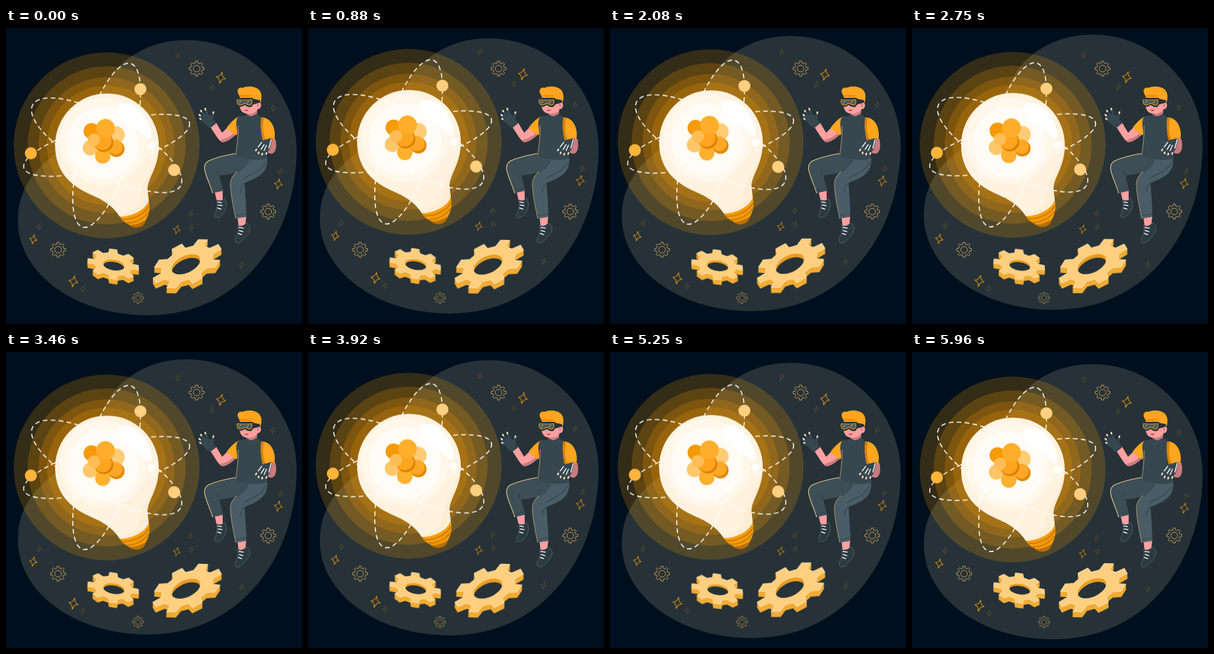
An HTML page without scripts that plays this animation: 500 px wide and 500 px high, repeating every 6000 ms.

```html
<!DOCTYPE html>
<html lang="en">
<head>
<meta charset="utf-8">
<title>Bright idea</title>
<style>
html, body { margin: 0; width: 100%; height: 100%; overflow: hidden; background: #000f1d; }
svg { display: block; width: 100vw; height: 100vh; }
.float { animation: float 3s linear -60ms infinite; }
.slow { animation-duration: 6s; }
.sway { transform-origin: 251px 404px; animation: sway 3s linear -60ms infinite; }
@keyframes float { 50% { transform: translateY(-10px); } }
@keyframes sway { 25% { transform: rotate(1deg); } 75% { transform: rotate(-1deg); } }
.halo { fill: #ffa000; fill-opacity: .2; }
.orbit { fill: none; stroke: #fff; stroke-width: 1.7; stroke-dasharray: 8 5.5; }
.line { fill: none; stroke: #e0ac5c; stroke-width: .9; }
.line use, .line circle, .spark use { vector-effect: non-scaling-stroke; }
.spark { fill: none; stroke: #f59a0c; stroke-width: 1.1; }
.dim { stroke: #a8721d; stroke-width: .8; }
.side { fill: #f0ab35; stroke: #f0ab35; stroke-width: .3; }
.face { fill: #ffcf80; stroke: #ffe6b8; stroke-width: .25; }
.skin { fill: #ffa0a0; }
.shade { fill: #c97b7d; }
.dark { fill: #37474f; }
.shoe { fill: #2c3a42; stroke: #5d6f78; stroke-width: .8; }
.rim { fill: none; stroke: #ffd48c; stroke-width: 1.1; }
.fold { fill: none; stroke: #33434b; stroke-width: 1.2; }
.lace { fill: none; stroke: #fff; stroke-width: 1.5; stroke-linecap: round; }
.finger { fill: none; stroke: #37474f; stroke-width: 4; stroke-linecap: round; stroke-linejoin: round; }
.tip { fill: none; stroke: #ffe0bd; stroke-width: 2.6; stroke-linecap: round; }
</style>
</head>
<body>
<svg viewBox="0 0 500 500" xmlns="http://www.w3.org/2000/svg">
<defs>
  <path id="cog" d="M9.3-2.2L12.6-1.9V1.9L9.3 2.2L8.1 5L10.2 7.6L7.6 10.2L5 8.1L2.2 9.3L1.9 12.6H-1.9L-2.2 9.3L-5 8.1L-7.6 10.2L-10.2 7.6L-8.1 5L-9.3 2.2L-12.6 1.9V-1.9L-9.3-2.2L-8.1-5L-10.2-7.6L-7.6-10.2L-5-8.1L-2.2-9.3L-1.9-12.6H1.9L2.2-9.3L5-8.1L7.6-10.2L10.2-7.6L8.1-5Z"/>
  <g id="icon"><use href="#cog"/><circle r="5.6"/></g>
  <path id="star" d="M0-10Q1-1.5 8 0Q1 1.5 0 10Q-1 1.5-8 0Q-1-1.5 0-10Z" transform="rotate(12)"/>
  <use id="dot" href="#star" transform="scale(.52)"/>
  <clipPath id="hole"><circle r="5.3"/></clipPath>
  <g id="bore" clip-path="url(#hole)">
    <circle r="5.3" fill="#e89c22"/><circle r="5.3" cy="2.2" fill="#263238"/>
  </g>
  <use id="big" href="#cog" transform="matrix(4.57 -1.46 0 2.88 0 0) rotate(27.4)"/>
  <use id="small" href="#cog" transform="matrix(3.39 .45 0 2 0 0)"/>
  <path id="glass" d="M83 198.400A87.500 87.500 0 0 1 258 198.400C258 238 238 254 239 274L241 292C235 309 211 319 192 319C184 306 173 297 157 288C137 278 83 262 83 198.400Z"/>
  <clipPath id="inGlass"><use href="#glass"/></clipPath>
</defs>

<path class="float slow" fill="#263238" d="M306 20.400C410 20.400 491 108 491 205C491 350 400 485.400 240 485.400C110 485.400 20 410 20 326C20 270 50 235 95 205C150 168 150 110 190 66C225 32 265 20.400 306 20.400Z"/>

<g class="line">
  <use href="#icon" x="322" y="68.500"/>
  <use href="#icon" x="88" y="374.500"/>
  <use href="#icon" x="443" y="310"/>
  <use href="#icon" transform="translate(223 456) scale(.75)"/>
</g>

<g class="float">
  <g class="spark">
    <use href="#star" x="363" y="84.400"/>
    <use href="#star" transform="translate(460 264) scale(.9)"/>
    <use href="#star" transform="translate(46 357.500) scale(.85)"/>
    <use href="#star" transform="translate(288.500 341) scale(.75)"/>
    <use href="#star" transform="translate(114 428.500)"/>
  </g>
  <g class="spark dim">
    <use href="#dot" x="290" y="47"/>
    <use href="#dot" x="348" y="101"/>
    <use href="#dot" x="451" y="136"/>
    <use href="#dot" x="463.500" y="243"/>
    <use href="#dot" x="398" y="400.500"/>
    <use href="#dot" x="312" y="314.500"/>
    <use href="#dot" x="313" y="337.500"/>
    <use href="#dot" x="56" y="336"/>
    <use href="#dot" x="130" y="441.500"/>
  </g>

  <g class="halo">
    <circle cx="170" cy="198.400" r="157"/>
    <circle cx="170" cy="198.400" r="133.500"/>
    <circle cx="170" cy="198.400" r="115"/>
    <circle cx="170" cy="198.400" r="101"/>
  </g>

  <path fill="#f59b0b" d="M192 318C213 318 235 308 241 290C244 305 242 316 235 327C233 338 216 340 207 332C201 329 195 325 192 318Z"/>
  <g fill="none" stroke="#c97a00" stroke-width="2">
    <path d="M195 323.500C215 325 236 314 242 300"/>
    <path d="M202 329.500C217 331 234 322 240.500 311"/>
  </g>
  <path fill="#b96f00" d="M208 333C219 334 230 328 235 325C235 338 216 341 208 333Z"/>

  <use href="#glass" fill="#fff3e0"/>
  <g clip-path="url(#inGlass)">
    <path fill="#fdebd0" d="M258 180C258 245 222 262 226 288C224 304 209 313 190 315L195 322L250 300V250L265 190Z" opacity=".7"/>
    <circle cx="164" cy="192" r="74" fill="#fff" opacity=".3"/>
    <circle cx="164" cy="194" r="61" fill="#fff" opacity=".55"/>
  </g>
  <path fill="#fff" d="M189 141C184 128 205 122 222 136C239 150 249 178 245 187C241 191 235 183 228 176C216 168 196 162 189 141Z"/>
  <circle cx="245.500" cy="199.500" r="6.800" fill="#fff"/>

  <g class="orbit" transform="translate(170 198.500)">
    <ellipse rx="42" ry="144" transform="rotate(16.400)"/>
    <ellipse rx="142.400" ry="47.300" transform="rotate(28.700)"/>
    <ellipse rx="145" ry="37" transform="rotate(-15.300)"/>
  </g>
  <circle cx="227" cy="103.600" r="10.200" fill="#ffcf80"/>
  <circle cx="42" cy="212" r="10.200" fill="#ffb43a"/>
  <circle cx="284" cy="240.300" r="10.200" fill="#ffcf80"/>

  <circle cx="144.500" cy="174.500" r="13.500" fill="#f59a08"/>
  <circle cx="186" cy="181" r="14.500" fill="#ffcb75"/>
  <circle cx="142.500" cy="203" r="12.800" fill="#ffc76a"/>
  <circle cx="186.500" cy="204.500" r="13.800" fill="#e08a00"/>
  <circle cx="184.500" cy="201.500" r="12.500" fill="#ffa726"/>
  <circle cx="163.500" cy="216.500" r="13" fill="#ffb02e"/>
  <circle cx="165" cy="193.500" r="16.300" fill="#d98200"/>
  <circle cx="163" cy="191" r="15.500" fill="#ffa41f"/>
  <circle cx="168" cy="170" r="16" fill="#ffae2b"/>
  <circle cx="148.500" cy="189" r="10.500" fill="#ffbe55"/>
</g>

<g class="sway">
  <g transform="translate(306 398)">
    <g class="side">
      <use href="#big" y="9"/><use href="#big" y="7"/><use href="#big" y="5"/><use href="#big" y="3"/><use href="#big" y="1"/>
    </g>
    <use href="#big" class="face"/>
    <use href="#bore" transform="translate(-2 1) matrix(4.57 -1.46 0 2.88 0 0)"/>
  </g>
  <g transform="translate(181 399)">
    <g class="side">
      <use href="#small" y="8"/><use href="#small" y="6"/><use href="#small" y="4"/><use href="#small" y="2"/>
    </g>
    <use href="#small" class="face"/>
    <use href="#bore" transform="translate(1 1.500) matrix(3.39 .45 0 1.700 0 0)"/>
  </g>
</g>

<g>
  <!-- far leg -->
  <path class="skin" d="M352 275L366 272L366 291L356 292Z"/>
  <path class="shoe" d="M356 290C361 293 366 291 369 288C375 297 372 307 367 313C363 320 354 323 352 318C355 309 358 302 356 290Z"/>
  <path class="lace" d="M358 294L364 295M358.500 299L365 300M357.500 304L363 306"/>
  <path fill="#3d4e57" d="M388 212C372 214 352 220 343 224C335 228 334 236 337 245C341 258 346 268 349 279L367 275C364 263 361 254 361 249C376 248 396 243 412 236L412 214Z"/>
  <path class="rim" d="M387 212C370 215 352 220 343 224C335 228 334 236 337 245C341 258 346 268 349 279"/>
  <path class="fold" d="M348 274L366 270M361 249C357 246 356 243 357 240"/>
  <!-- near leg -->
  <path class="skin" d="M391 319L406 316L404 335L393 336Z"/>
  <path class="shoe" d="M391 333C396 336 402 334 406 329C415 335 413 343 408 349C402 357 396 364 389 363C385 360 387 355 390 350C392 344 393 340 391 333Z"/>
  <path class="lace" d="M393.500 337L401 338M394 342L400 344M392.500 347L398 349"/>
  <path fill="#4a5c65" d="M388 215C404 222 424 221 441 219C442 232 439 241 430 248C421 255 411 258 403 262C404 279 406 300 406 319L388 322C384 301 379 281 379 263C379 252 389 244 398 237C405 231 408 226 410 222Z"/>
  <path class="fold" d="M387 317L406 314M403 262C398 265 396 270 396 278M410 223C405 234 397 239 391 244M438 226C432 243 412 247 402 254"/>
  <path class="rim" d="M388 322C384 301 379 281 379 263C379 255 384 248 390 243" stroke-opacity=".55"/>

  <!-- raised arm -->
  <path class="skin" d="M375 167L365 177L355 160L345 167C352 177 358 189 365 193C374 192 382 186 389 179Z"/>
  <path class="shade" d="M365 193C374 192 382 186 389 179L387 175C379 184 371 187 362 189Z"/>
  <path fill="#ffa51f" d="M397 149C389 149 380 159 373 168C378 175 384 179 389 181L399 168Z"/>
  <path class="dark" d="M331 150C335 144 342 145 346 148L355 161L345 169C339 167 333 160 331 150Z"/>
  <path class="finger" d="M335 154L328 148M337 150L330 141M341 149L337 138M348 154L350 144M337 159L329 154"/>
  <path class="tip" d="M328 148L326.500 146.500M330 141L329 139.500M337 138L336.500 136M350 144L350.500 142M329 154L327.500 153"/>
  <path class="fold" stroke="#5d6f78" d="M343 167L353 159"/>

  <!-- neck and torso -->
  <path class="shade" d="M407 139L425 134L423 153L406 153Z"/>
  <path class="dark" d="M394 149C401 149 405 148 408 146C412 151 418 149 423 145C429 147 433 152 433 160C433 180 438 202 442 220C425 226 404 222 388 216C390 198 392 180 389 164C389 156 390 151 394 149Z"/>
  <path class="rim" d="M392 165C393 181 390 201 388 215" stroke-opacity=".55" stroke-width=".8"/>
  <path fill="#ffa51f" d="M431 151C443 151 450 159 453 171C455 180 454 187 452 191L434 190C430 177 430 162 431 151Z"/>
  <path fill="#d68300" d="M431 151C430 164 430 177 434 190L439 190C433 177 433 163 436 152Z"/>
  <path class="shade" d="M440 190L455 187C458 199 456 210 450 212C445 213 440 210 438 207Z"/>
  <path class="dark" d="M429 194C435 188 443 187 450 186L445 206C439 211 430 207 429 194Z"/>
  <path class="finger" d="M431 196L423 205M434 200L427 210M438 203L433 212M442 202L440 211"/>
  <path class="tip" d="M423 205L422 207M427 210L426.500 212M433 212L432.500 214M440 211L439.500 213"/>
  <path class="lace" stroke-width=".8" d="M432 193L426 201M436 197L431 205M440 198L436 207M448 188L444 203"/>

  <!-- head -->
  <path class="skin" d="M395 117L426 111C429 124 428 139 419 143C413 146 401 146 397 139C394 134 393 126 395 117Z"/>
  <ellipse class="skin" cx="426" cy="130.500" rx="4.800" ry="6.500"/>
  <path class="shade" d="M424 128C428 127 428 133 425 134Z"/>
  <path fill="#b5484e" d="M402 137.500C405 139 408 138.500 410 136.500C409 141 405 142 402 137.500Z"/>
  <path fill="#ffa51f" d="M393 112C389 106 392 99 400 101C409 97 421 99 427 104C433 110 432 119 430 126C427 122 424 124 421 127L418 118C409 119 401 116 395 117Z"/>
  <path fill="#e58f08" d="M395 114C404 111 411 116 417 112C413 120 402 115 395 117Z"/>
  <path fill="#263238" d="M415 119L429 122V126L415 130Z"/>
  <path fill="#263238" d="M389 118C398 118 408 118 417 118C419 123 418 130 415 133C410 135 406 132 403 130C399 134 393 134 390 131C388 127 388 122 389 118Z"/>
  <path fill="#455a64" stroke="#e59a18" stroke-width="1.200" d="M391 121C399 122 407 122 415 121C416 125 415 129 413 130C409 131 406 128 403 127C399 130 395 131 392 129C390 126 390 123 391 121Z"/>
  <path fill="none" stroke="#ffc25c" d="M394 127L397 123M407 127L410 123"/>
</g>
</svg>
</body>
</html>
```
